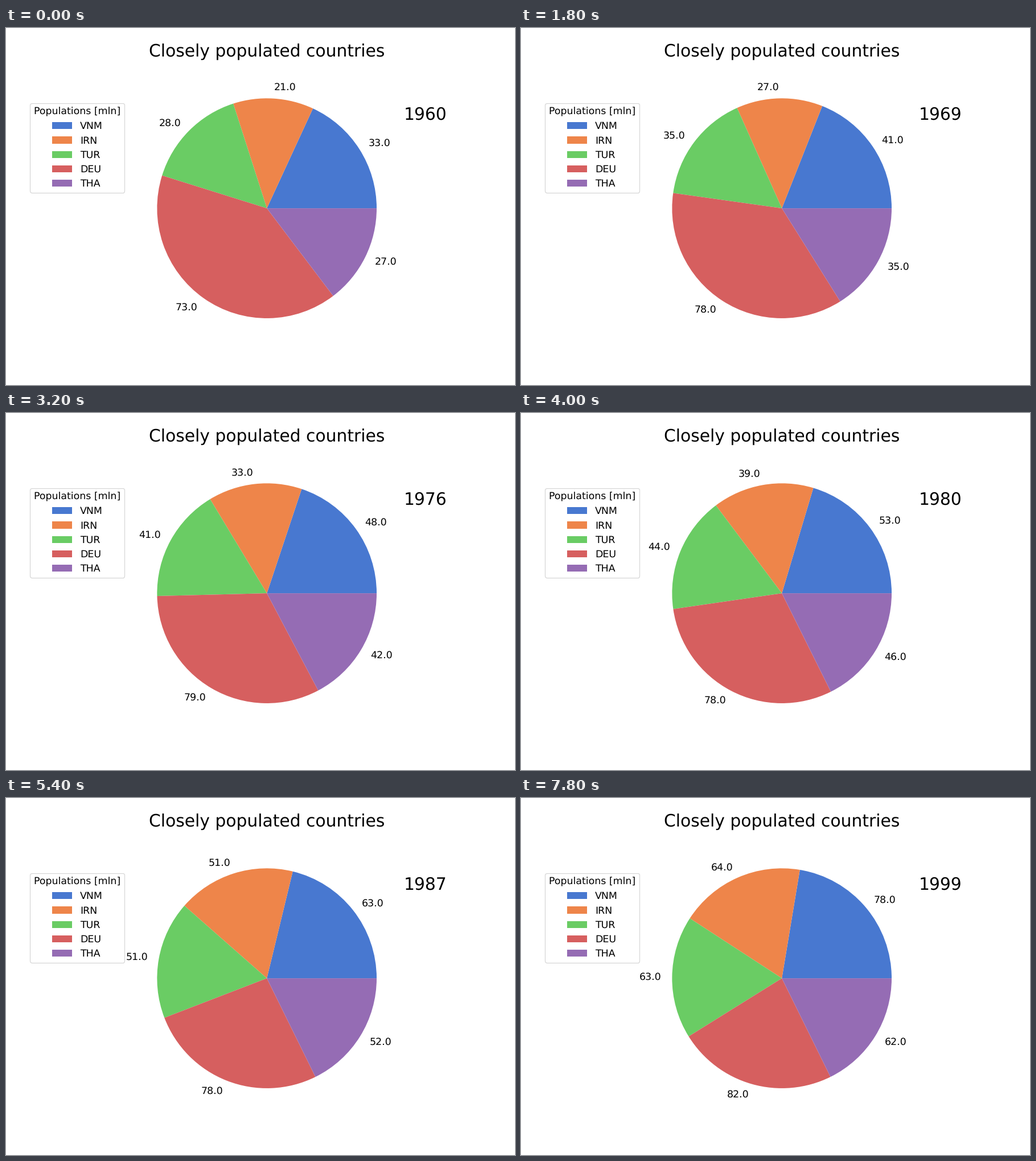
These frames come from a looping animation (894x626 px, 8 s). A matplotlib script:

```python
import math
import matplotlib.pyplot as plt
from matplotlib.animation import FuncAnimation

W, H, DPI = 894, 626, 72
PT = W / 10 / 72  # lengths are scaled as on a sheet ten inches wide
SMALL, BIG = 14 * PT, 24 * PT
FIRST, LAST = 1960, 1999


def growth(t, base, rate, *waves):
    """Steady growth plus S-shaped waves, each given as (gain, middle, span)."""
    return base + rate * t + sum(gain / (1 + math.exp((mid - t) / span))
                                 for gain, mid, span in waves)


# country: colour, then its growth in millions
COUNTRIES = {
    "VNM": ("#4878d0", 32.6, 0.85, (14, 26.5, 6)),
    "IRN": ("#ee854a", 21.4, 0.617, (19.4, 24, 3.9)),
    "TUR": ("#6acc64", 27.3, 0.74, (8.6, 28, 8)),
    "DEU": ("#d65f5f", 68.9, -0.08, (11.2, 2.4, 3.5), (5, 31.2, 1.8)),
    "THA": ("#956cb4", 25.9, 0.72, (8, 14.5, 6)),
}
COLORS = [color for color, *_ in COUNTRIES.values()]

plt.rcParams.update({"font.family": "DejaVu Sans", "text.hinting": "none"})
fig, ax = plt.subplots(figsize=(W / DPI, H / DPI), dpi=DPI)


def draw(i):
    values = [growth(i, *curve) for _, *curve in COUNTRIES.values()]
    ax.clear()
    wedges, _ = ax.pie(values, labels=[f"{round(v)}.0" for v in values],
                       colors=COLORS, textprops={"fontsize": SMALL})
    ax.set_title("Closely populated countries", fontsize=BIG, pad=20 * PT)
    ax.text(1.25, 0.805, str(FIRST + i), fontsize=BIG)
    legend = ax.legend(wedges, list(COUNTRIES), title="Populations [mln]",
                       fontsize=SMALL, title_fontsize=SMALL, labelspacing=0.51,
                       loc="upper right", bbox_to_anchor=(0, 0.9))
    legend.get_frame().set_linewidth(PT)
    return []


anim = FuncAnimation(fig, draw, frames=LAST - FIRST + 1, init_func=lambda: [],
                     interval=200, repeat=True, repeat_delay=0)
plt.show()
```
